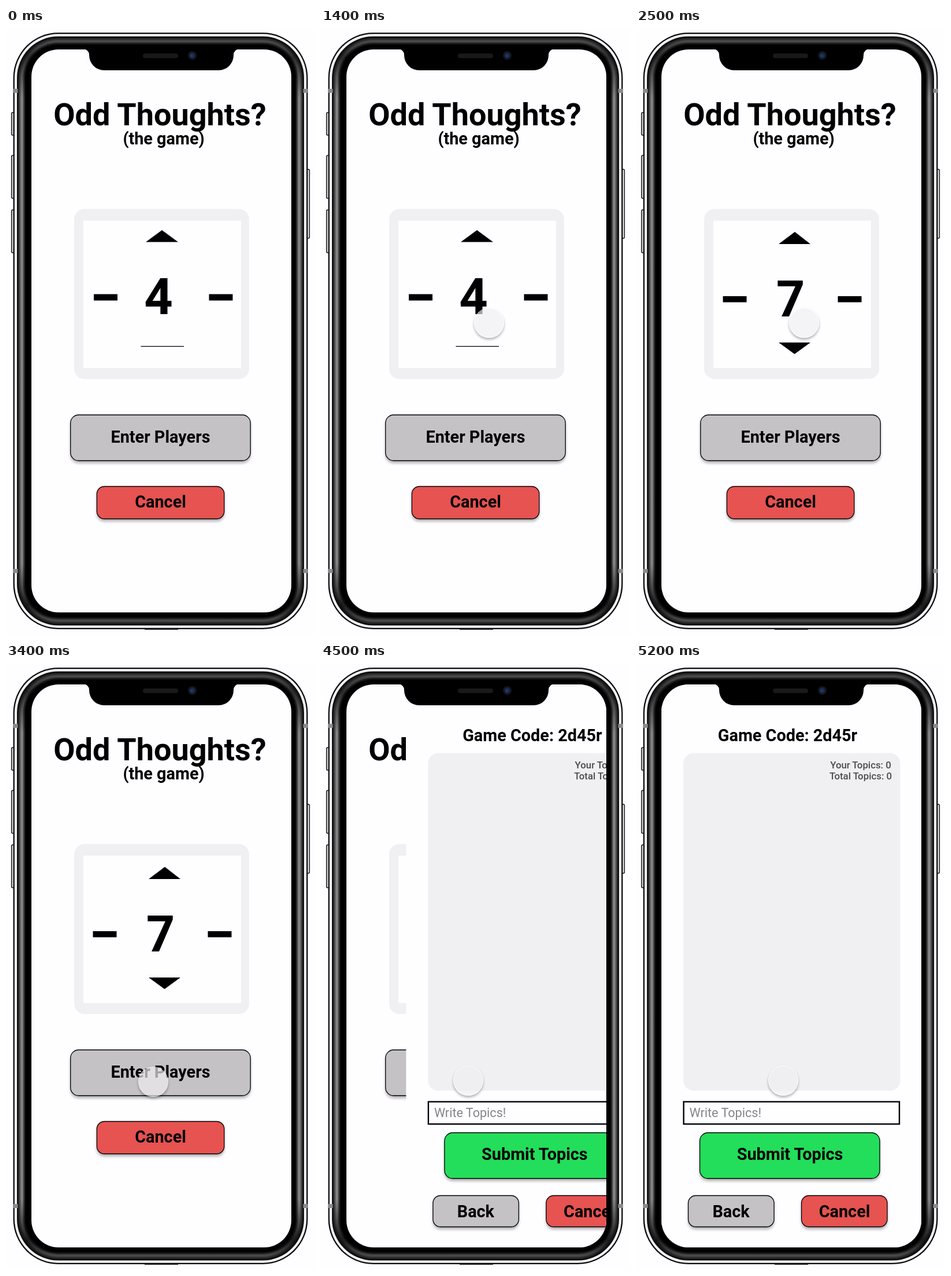
An HTML page for the animation above (5.3 s loop, 535 by 1048 pixels).

```html
<!DOCTYPE html>
<html lang="en">
<head>
<meta charset="utf-8">
<title>Player picker</title>
<style>
  html, body { margin: 0; width: 100%; height: 100%; overflow: hidden; background: #fefdff; }
  svg { position: absolute; left: 0; top: 0; }
  text { font: 700 28.8px Roboto, Arial, sans-serif; text-anchor: middle; }
  .title { font-size: 54px; }
  .digit { font-size: 86.4px; }
  .count { font-size: 16.8px; font-weight: 500; fill: #4b4b50; }
  .hint { font-size: 21.6px; font-weight: 400; fill: #858489; text-anchor: start; }
  .paper { fill: #fefdff; }
  .panel { fill: #f0eff1; }
  .button { stroke: #000; stroke-width: 1.3; filter: drop-shadow(0 4px 2px rgba(0,0,0,.27)); }
  .grey { fill: #c4c2c4; }
  .red { fill: #e65351; }
  .green { fill: #23de5a; }
  #touch {
    position: absolute; left: -26px; top: -26px; width: 52px; height: 52px;
    box-sizing: border-box; border-radius: 50%;
    border: 1.5px solid rgba(255,255,255,.75);
    background: rgba(239,238,240,.68); background-clip: padding-box;
    box-shadow: 0 3px 4px rgba(0,0,0,.3);
  }
</style>
</head>
<body>
<svg width="535" height="1048" viewBox="0 0 535 1048">
  <defs>
    <clipPath id="screen"><rect x="44" y="37" width="450" height="972" rx="47"/></clipPath>
    <linearGradient id="steel" x2="0" y2="1">
      <stop offset="0" stop-color="#4a4a4a"/>
      <stop offset=".03" stop-color="#2c2c2c"/>
      <stop offset=".1" stop-color="#858585"/>
      <stop offset=".9" stop-color="#858585"/>
      <stop offset=".97" stop-color="#1c1c1c"/>
      <stop offset="1" stop-color="#4a4a4a"/>
    </linearGradient>
    <linearGradient id="key">
      <stop offset="0" stop-color="#999"/>
      <stop offset=".5" stop-color="#f2f2f2"/>
      <stop offset="1" stop-color="#bbb"/>
    </linearGradient>
  </defs>

  <!-- phone body -->
  <g fill="url(#key)" stroke="#111" stroke-width="1.3">
    <rect x="9.5" y="146" width="6" height="39" rx="2"/>
    <rect x="9.5" y="220" width="6" height="74" rx="2"/>
    <rect x="9.5" y="314" width="6" height="74" rx="2"/>
    <rect x="520" y="244" width="5.5" height="119" rx="2"/>
  </g>
  <rect x="240" y="1037" width="58" height="2" fill="#333"/>
  <g id="body"></g>
  <g fill="#8b8b8e">
    <rect x="12.5" y="105" width="8" height="7"/>
    <rect x="514.5" y="105" width="8" height="7"/>
    <rect x="12.5" y="934" width="8" height="7"/>
    <rect x="514.5" y="934" width="8" height="7"/>
  </g>

  <g clip-path="url(#screen)">
    <rect class="paper" x="44" y="37" width="450" height="972"/>
    <text class="title" x="266.5" y="168">Odd Thoughts?</text>
    <text x="273" y="201">(the game)</text>
    <rect class="panel" x="118" y="312.5" width="303" height="293.5" rx="18"/>
    <rect class="paper" x="134" y="332.5" width="273" height="254.5"/>
    <g id="four">
      <path d="M242 369.5L270 349L298 369.5zM152 459.5h41v11h-41zM351.5 459.5h41v11h-41zM233.5 549h74.5v1.2h-74.500z"/>
      <text class="digit" x="264" y="494">4</text>
    </g>
    <g id="seven">
      <path d="M247 373L275 352L302 373zM247 543h55L274.5 563zM150.500 463h41v10.500h-41zM349.500 463h41v10.500h-41z"/>
      <text class="digit" x="267.5" y="498">7</text>
    </g>
    <rect class="button grey" x="111.700" y="668" width="311.500" height="79" rx="14"/>
    <text x="267.500" y="716">Enter Players</text>
    <rect class="button red" x="157.300" y="791.500" width="220.500" height="56" rx="13"/>
    <text x="267.500" y="828">Cancel</text>

    <g id="topics">
      <rect class="paper" x="44" y="37" width="450" height="972"/>
      <text x="262.500" y="135">Game Code: 2d45r</text>
      <rect class="panel" x="82" y="155.500" width="375.500" height="583" rx="18"/>
      <text class="count" x="389" y="182">Your Topics: 0</text>
      <text class="count" x="389" y="201">Total Topics: 0</text>
      <rect class="paper" x="82.500" y="757.500" width="373.500" height="38.500" stroke="#000" stroke-width="2.400"/>
      <text class="hint" x="92.500" y="784">Write Topics!</text>
      <rect class="button green" x="110.500" y="811" width="311.500" height="79" rx="14"/>
      <text x="266.500" y="858">Submit Topics</text>
      <rect class="button grey" x="90.500" y="919.500" width="148.500" height="54" rx="13"/>
      <text x="164.500" y="957">Back</text>
      <rect class="button red" x="286.500" y="919.500" width="148.500" height="54" rx="13"/>
      <text x="361" y="957">Cancel</text>
    </g>
  </g>

  <!-- notch, speaker and camera -->
  <path d="M133 36Q144 37 144 47A26 26 0 0 0 170 73H368A26 26 0 0 0 394 47Q394 37 405 36z"/>
  <rect x="237" y="44" width="61" height="8" rx="4" fill="#19191b"/>
  <circle cx="322.500" cy="47.500" r="7.500" fill="#14171f"/>
  <circle cx="322.500" cy="47.500" r="4.500" fill="#1a2c52"/>
  <circle cx="321.500" cy="48" r="1.500" fill="#2b477a"/>
</svg>
<div id="touch"></div>
<script>
  const LOOP = 5300;
  const $ = id => document.getElementById(id);

  // nested outlines of the phone: inset, fill and opacity
  $('body').innerHTML = [
    [0, '#0c0c0c', 1], [2.3, '#f3f2f5', 1], [6.5, '#0c0c0c', 1],
    [9, 'url(#steel)', .35], [11, 'url(#steel)', .45], [13, 'url(#steel)', 1],
    [17, '#000', .45], [19, '#000', .6], [21, '#000', 1]
  ].map(([d, fill, opacity]) =>
    `<rect x="${12.5 + d}" y="${8 + d}" width="${510 - 2 * d}" height="${1030 - 2 * d}"
      rx="${78 - d}" fill="${fill}" opacity="${opacity}"/>`
  ).join('');

  const bezier = (a, b, s) => 3 * a * s * (1 - s) ** 2 + 3 * b * s * s * (1 - s) + s ** 3;

  // ease-in-out progress of t between two times
  function ease(t, from, to) {
    const x = Math.min(1, Math.max(0, (t - from) / (to - from)));
    let low = 0, high = 1;
    for (let i = 0; i < 20; i++) {
      const mid = (low + high) / 2;
      if (bezier(.42, .58, mid) < x) low = mid; else high = mid;
    }
    return bezier(0, 1, low);
  }

  function draw(t) {
    const enter = ease(t, 250, 950);
    const down = ease(t, 3000, 3400);
    const settle = ease(t, 3400, 3600);
    const x = 412 - 121 * enter - 36 * down;
    const y = 990 - 481 * enter + 214 * down - 2 * settle;
    $('touch').style.transform = `translate(${x}px, ${y}px)`;
    $('touch').style.visibility = t < 300 ? 'hidden' : 'visible';

    const swap = ease(t, 2000, 2500);
    $('four').setAttribute('opacity', 1 - swap);
    $('seven').setAttribute('opacity', swap);

    const slide = 450 * (1 - ease(t, 3893, 4803));
    $('topics').setAttribute('transform', `translate(${slide})`);
  }

  const start = performance.now();
  function tick() {
    draw((performance.now() - start) % LOOP);
    requestAnimationFrame(tick);
  }
  tick();
</script>
</body>
</html>
```
